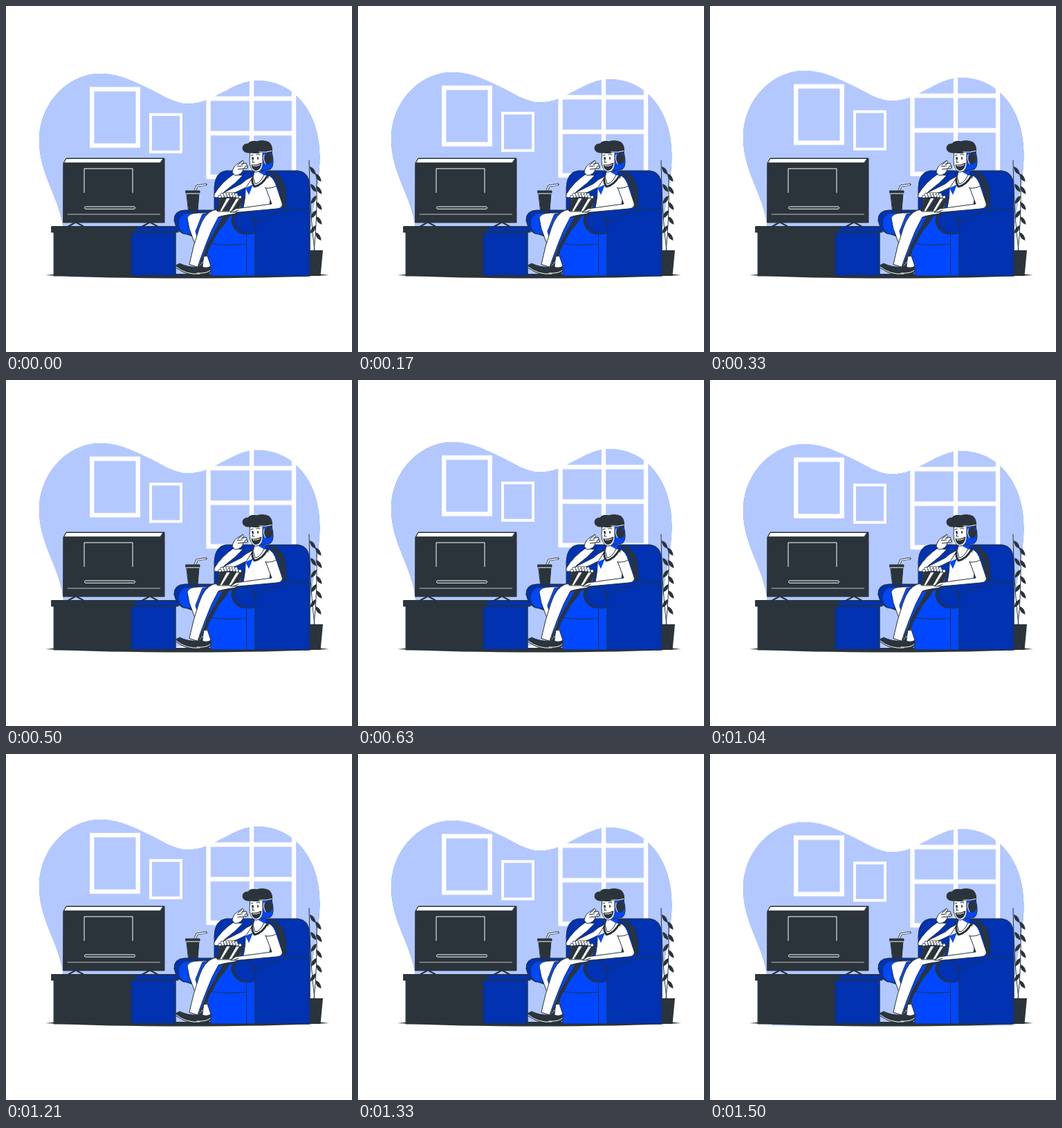
An HTML page without scripts that plays this animation: 500x500 px, repeating every 1540 ms.

```html
<!DOCTYPE html>
<html lang="en">
<head>
<meta charset="utf-8">
<title>Evening at home</title>
<style>
  html, body { margin: 0; height: 100%; overflow: hidden; background: #fff; }
  svg { display: block; width: 100vw; height: 100vh; }
  .ink { fill: #2b343b; }
  .white { fill: #fff; }
  .bright { fill: #0047ff; }
  .deep { fill: #0032b2; }
  .line { fill: none; }
  .plain { stroke: none; }
  .edge { stroke: #263238; stroke-width: 1; stroke-linejoin: round; stroke-linecap: round; }
  .chalk { stroke: #fff; stroke-width: 1; fill: none; }
  .wall { animation: float 1540ms linear infinite; }
  @keyframes float {
    0%, 100% { transform: translateY(0); }
    46.5% { transform: translateY(-9.4px); }
    97.4% { transform: translateY(.5px); }
  }
</style>
</head>
<body>
<svg viewBox="0 0 500 500">
  <defs>
    <path id="blob" d="M83 325C79 278 48 245 48 195C48 140 90 98 136 98C163 98 184 109 205 119C225 128 242 141.500 264 141.500C300 141.500 328 108 363 108C417 108 453.500 155 453.500 218C453.500 265 438 300 436 374V392H90Z"/>
    <path id="leaf" d="M0 0Q8 2 8.500 12Q0 9 0 0Z"/>
    <path id="feet" d="M100 313L90 318.500M102 313L112 318.500"/>
    <path id="kernels" d="M309 275.500Q324 273 340 276.500M312 272.500Q323 270 336 273"/>
  </defs>

  <g class="wall">
    <use href="#blob" class="bright"/>
    <use href="#blob" class="white" opacity=".7"/>
    <g fill="none" stroke="#fff">
      <rect x="124.200" y="120.400" width="66.600" height="81.500" stroke-width="6.400"/>
      <rect x="209" y="157" width="44" height="54" stroke-width="4"/>
      <path d="M292.500 100V247H416V100M355 90V247M290 134H419M290 184H419" stroke-width="6.300"/>
    </g>
  </g>

  <path class="ink" d="M57 389Q75 386.500 90 387H440Q455 387 467 389Q380 393.500 262 393.500Q140 393.500 57 389Z"/>

  <!-- plant -->
  <g class="ink">
    <path class="line edge" d="M438 223Q439 300 446 354M449 248Q450 310 445 354"/>
    <use href="#leaf" x="439" y="232"/>
    <use href="#leaf" x="440" y="257"/>
    <use href="#leaf" x="447" y="242"/>
    <use href="#leaf" x="448" y="260"/>
    <use href="#leaf" x="448" y="283"/>
    <use href="#leaf" x="448" y="304"/>
    <use href="#leaf" x="447" y="327"/>
    <use href="#leaf" transform="translate(449 274) scale(-1 1)"/>
    <use href="#leaf" transform="translate(449 295) scale(-1 1)"/>
    <use href="#leaf" transform="translate(448 317) scale(-1 1)"/>
    <path d="M437 353H458L454.500 390H437Z"/>
  </g>

  <!-- television and cabinet -->
  <g class="edge">
    <use href="#feet" class="line" stroke-width="2"/>
    <use href="#feet" class="line" stroke-width="2" x="107"/>
    <path class="ink" d="M83 227L87 220H229V313H83Z"/>
    <path class="white" d="M83.500 226.500L87 220.500H227L223 226.500Z"/>
    <path class="ink" d="M66 318.500H249V327H245V390H69V327H66Z"/>
    <path class="deep" d="M187 319H249V326H187Z"/>
    <path class="deep" d="M181 327H245V389.500H181Z"/>
  </g>
  <g class="chalk">
    <path d="M113 270V235H183V270"/>
    <rect x="113.500" y="290" width="73" height="3.300" rx="1.600"/>
    <path d="M89 301H223" opacity=".7"/>
    <path d="M69 328V388" opacity=".2"/>
  </g>

  <!-- armchair back and seat -->
  <g class="edge">
    <path class="deep" d="M301 300V262Q302 240 318 238H422Q439 240 439 262V390H301Z"/>
    <path class="ink" d="M379 238Q403 243 404 272V290H398Q400 254 379 238Z"/>
    <path class="deep" d="M243 310Q242 296 258 295H330V345H300L262 330Q247 330 243 310Z"/>
    <path class="bright" d="M249 314Q250 299 266 299L300 297V330H262Q250 329 249 314Z"/>
    <path class="bright" d="M300 303H335Q340 326 349 330V390H296L288 340Z"/>
    <path class="line" d="M294 343Q322 347 348 344"/>
  </g>

  <!-- drink -->
  <g class="edge">
    <path d="M273 267L276 260L289 258" class="line" style="stroke-width:3.200"/>
    <path d="M273 267L276 260L288.500 258.300" class="chalk" style="stroke-width:1.600"/>
    <path class="ink" d="M261 270H279L277 296H264Z"/>
    <path class="ink" d="M260 267H280V270H260Z"/>
    <path class="chalk" d="M261 271H279"/>
  </g>

  <!-- viewer -->
  <g class="edge">
    <path class="white" d="M262 306Q264 299 279 299H300L280 330L296 378L284 378Q276 350 265 322Z"/>
    <path class="bright" d="M284 301L294 299L277 336L274 326Z"/>
    <path class="ink" d="M309 304L324 301Q316 316 307 325L293 350L289 362L278 377Z"/>
    <path class="bright plain" d="M306 306L313 305L291 344L281 370L278 370Z"/>
    <path class="white" d="M265 373Q270 348 279 322Q286 300 300 295L346 291V299Q318 301 307 305Q297 322 289 344Q282 362 277 377Z"/>
    <path class="white" d="M346 255L356 246Q364 241 380 245L386 250L380 294L341 298Q347 280 346 255Z"/>
    <path class="bright plain" d="M346 263L357 258L351 273Z"/>
    <path class="white" d="M360 238L373 239L372 246Q366 257 360 257L357 247Z"/>
    <path class="bright plain" d="M363 239L376 236L374 245Z"/>
    <path class="line" style="stroke-width:3" d="M355.500 246Q355 256 359 261Q370 259 378 245"/>
    <path class="white" d="M357 246Q347 250 340 257L310 272L305 278Q324 274 347 262Z"/>
    <path class="white" d="M329 243L342 245Q332 256 316 268L308 276Q299 279 301 272Q311 255 329 243Z"/>
    <path class="white" d="M327 240Q328 231 338 226L342 223L344 226L340 229L347 227L349 233L343 235Q342 244 331 245Z"/>
    <path class="line" d="M334 232L342 231M335 236L343 235M341 225L335 230"/>
    <circle class="white" cx="347" cy="233" r="2"/>

    <path class="bright" d="M368 211H384Q389 231 382 236L369 238Z"/>
    <path class="white" d="M353 210H371L371 230Q369 240 361 240Q352 238 352 224Z"/>
    <path class="ink" d="M355 230Q362 231 369 227Q368 237 361 237.500Q356 237 355 230Z"/>
    <path class="chalk" d="M357 231Q362 232 367 229.500"/>
    <path class="line" d="M358 219L356 226L359 226M354 216L357 215M362 215Q365 213 367 215"/>
    <path class="line" d="M356 219V221M364 219V221" style="stroke-width:1.800"/>
    <path class="ink" d="M354 212Q343 213 342 206Q342 199 350 199Q353 194 362 196Q372 193 380 197Q386 202 384 213L371 211Q362 214 354 212Z"/>
    <ellipse class="ink" cx="379" cy="221" rx="5.500" ry="7.500"/>
    <path class="chalk" d="M366 211Q376 212 384 209.500M373 215Q371 222 375 228"/>
  </g>

  <!-- popcorn -->
  <g class="edge">
    <path class="white" d="M308 277L344 278L336 297L306 297Z"/>
    <path class="ink" d="M309 277H319L309 296H305ZM325 277H333L322 296H313ZM338 278H344L334 297H326Z"/>
    <use href="#kernels" fill="none" stroke-width="4.800" stroke-dasharray="0 4.200"/>
    <use href="#kernels" fill="none" stroke="#fff" stroke-width="3.600" stroke-dasharray="0 4.200"/>
  </g>

  <!-- front armrest -->
  <g class="edge">
    <path class="deep" d="M340 297L404 289Q412 290 412 294L439 292V390H358V330Z"/>
    <path class="bright" d="M348 328H360V390H348Z"/>
    <path class="ink" d="M326 312Q325 298 341 297L345 330Q330 328 326 312Z"/>
    <path class="deep" d="M329 312Q329 298 343 297Q361 300 361 322Q361 330 353 330Q332 329 329 312Z"/>
    <path class="deep" d="M340 297L398 289Q405 290 407 296Q376 299 362 312Q358 299 340 297Z"/>
    <path class="white" d="M380 245Q387 248 391 261L399 285Q401 292 391 293L336 298L324 298L332 293L384 286L375 262Z"/>
    <path class="line" d="M375 263Q384 264 391 260M329 298L336 295"/>
    <path class="white plain" d="M376 250L382 248L379 262L374 262Z"/>
  </g>

  <!-- shoes -->
  <g class="edge">
    <path class="ink" d="M272 381Q283 376 291 363L296 376Q298 388 286 389H270Z"/>
    <path class="white" d="M286 362L291 361L296 376Q290 380 284 377Z"/>
    <path class="ink" d="M245 375L251 372Q263 378 276 377L281 389Q264 391 247 379Z"/>
    <path class="chalk" d="M246 377Q261 389 280 387M276 386Q290 387 295 382"/>
  </g>
</svg>
</body>
</html>
```
